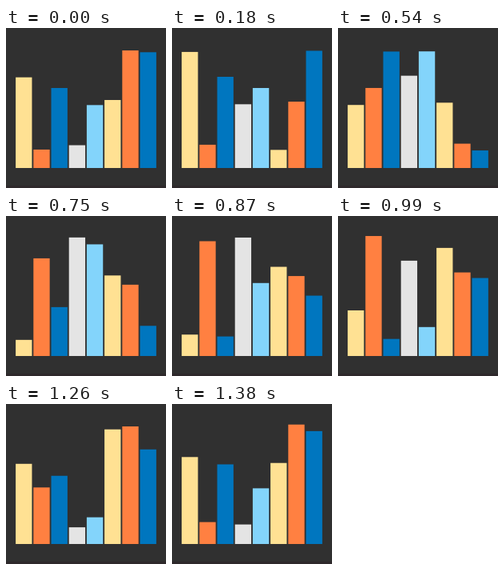
Write a matplotlib script that moves like this. It is 200 px wide and 200 px high and loops after 1410 ms.

```python
import numpy as np
import matplotlib.pyplot as plt
from matplotlib.animation import FuncAnimation
from matplotlib.patches import Rectangle

SIZE, DPI = 200, 100
FRAMES, STEP_MS = 47, 30

BACKGROUND, STRIP = "#303030", "#2e292b"
YELLOW, ORANGE, BLUE = "#ffe193", "#ff8041", "#0076bf"
GREY, SKY = "#e4e4e4", "#83d4fb"

BASE = 175
LEFT, PITCH, WIDTH = 12.1, 22.2, 20.35
COLORS = [YELLOW, ORANGE, BLUE, GREY, SKY, YELLOW, ORANGE, BLUE]
DELAYS = [3, 7, 4, 6, 5, 0, 1, 2]   # in eighths of the loop
HEIGHTS = [150, 20, 100]            # key heights, a third of the loop apart

CURVE = np.linspace(0, 1, 400)
EASE_X = 1.5 * CURVE * (1 - CURVE) + CURVE**3
EASE_Y = CURVE**2 * (3 - 2 * CURVE)


def ease(x):
    """Cubic bezier (0.5, 0, 0.5, 1)."""
    return np.interp(x, EASE_X, EASE_Y)


def bar_height(phase):
    pos = (phase % 1) * 3
    key = int(pos)
    start, end = HEIGHTS[key % 3], HEIGHTS[(key + 1) % 3]
    return start + (end - start) * ease(pos - key)


fig = plt.figure(figsize=(SIZE / DPI, SIZE / DPI), dpi=DPI, facecolor=BACKGROUND)
ax = fig.add_axes([0, 0, 1, 1])
ax.set_xlim(0, SIZE)
ax.set_ylim(SIZE, 0)
ax.axis("off")

ax.add_patch(Rectangle((0, 197), SIZE, 3, color=STRIP, lw=0))
bars = [
    ax.add_patch(Rectangle((LEFT + i * PITCH, BASE), WIDTH, 0,
                           color=color, lw=0, snap=False))
    for i, color in enumerate(COLORS)
]


def update(frame):
    for bar, delay in zip(bars, DELAYS):
        # the drop is half done when a bar's delay has passed
        bar.set_height(-bar_height(frame / FRAMES - delay / 8 + 1 / 6))
    return bars


anim = FuncAnimation(fig, update, frames=FRAMES, interval=STEP_MS,
                     repeat=True, repeat_delay=0)
plt.show()
```
